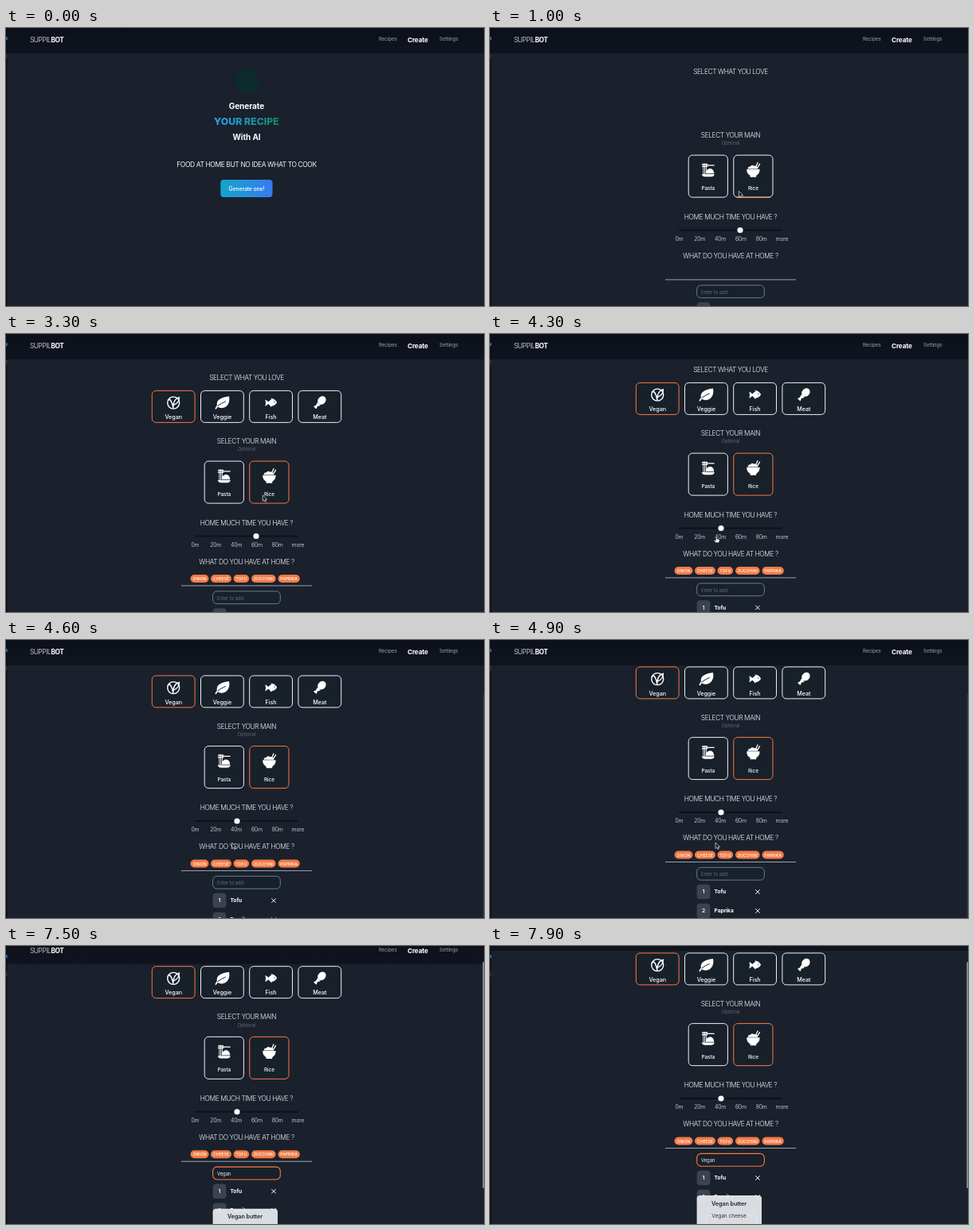
Animation, 600 px wide and 350 px high, one loop 8 s. Source, as an HTML page:

```html
<!DOCTYPE html>
<html lang="en">
<head>
<meta charset="utf-8">
<title>Recipe generator</title>
<style>
html, body { margin: 0; width: 100%; height: 100%; overflow: hidden; background: #1a212c; }
svg { display: block; width: 600px; height: 350px; font-family: Inter, Roboto, sans-serif; }
</style>
</head>
<body>
<svg id="stage" viewBox="0 0 600 350" xmlns="http://www.w3.org/2000/svg">
  <defs>
    <linearGradient id="title"><stop offset="0" stop-color="#2fa4ec"/><stop offset=".55" stop-color="#1c92b4"/><stop offset="1" stop-color="#12895a"/></linearGradient>
    <linearGradient id="button"><stop offset="0" stop-color="#13a5cb"/><stop offset="1" stop-color="#397af0"/></linearGradient>
    <linearGradient id="hover"><stop offset="0" stop-color="#12b1d2"/><stop offset="1" stop-color="#2d6be6"/></linearGradient>
    <linearGradient id="bar" x2="0" y2="1"><stop offset="0" stop-color="#0c101b"/><stop offset="1" stop-color="#0f141f"/></linearGradient>
  </defs>
</svg>
<script>
const LOOP = 8000, STEP = 100;
const WHITE = '#fff', EDGE = '#eef0f3', ORANGE = '#f47b45', INK = '#1a212c';
const svg = document.getElementById('stage');

function el(tag, attrs, parent, text) {
  const n = document.createElementNS('http://www.w3.org/2000/svg', tag);
  set(n, attrs);
  if (text) n.textContent = text;
  parent.appendChild(n);
  return n;
}
function set(n, attrs) {
  for (const k in attrs) n.setAttribute(k, attrs[k]);
}
const group = (parent, x = 0, y = 0) => el('g', { transform: `translate(${x} ${y})` }, parent);
const rect = (p, x, y, width, height, rx, fill, more) =>
  el('rect', { x, y, width, height, rx, fill, ...more }, p);
const path = (p, d, more) => el('path', { d, fill: WHITE, ...more }, p);
const line = (p, d, width, stroke = WHITE) =>
  path(p, d, { fill: 'none', stroke, 'stroke-width': width, 'stroke-linecap': 'round', 'stroke-linejoin': 'round' });
// text placed by the middle of its capitals
function label(p, x, cy, str, size, weight = 400, fill = WHITE, anchor = 'middle', track = -.01) {
  return el('text', {
    x, y: cy + size * .36, 'font-size': size, 'font-weight': weight, fill,
    'text-anchor': anchor, 'letter-spacing': track * size
  }, p, str);
}
const heading = (p, cy, str) => label(p, 302, cy, str, 8.4, 300, '#f1f3f5', 'middle', -.05);
const show = (n, on) => set(n, { display: on ? 'inline' : 'none' });

// piecewise linear track: [time, value] pairs
function track(t, keys) {
  let a = keys[0];
  for (const b of keys) {
    if (t < b[0]) return b === a ? a[1] : a[1] + (b[1] - a[1]) * (t - a[0]) / (b[0] - a[0]);
    a = b;
  }
  return a[1];
}
const fade = (t, from, ms) => track(t, [[from, 0], [from + ms, 1]]);

const icons = {
  Vegan(g) {
    el('circle', { r: 7.5, fill: 'none', stroke: WHITE, 'stroke-width': 1.4 }, g);
    line(g, 'M-4.6-4C-2.6-2.4-1.2 1.4-.4 6.4C-.6 1.6 .6-4.6 7.2-7C7.4-2.4 5 1-.1 3', 1.4);
    line(g, 'M-6.8-3.6L-4.6-4', 1.4);
  },
  Veggie(g) {
    path(g, 'M-9 7.4C-8 5.4-7.2 4.4-6.6 3.2C-7.6-4-1-6.6 8.6-8C10.4 0 6 7-1 6.6C-3 6.5-4.4 5.8-5.4 5.2L-8 8.4Z');
    line(g, 'M-5.6 4C-2.4 1 .6 0 4-1.6', 1, INK);
  },
  Fish(g) {
    path(g, 'M-7.4-3.9C-5.6-3.4-4-2.2-3-1.2C-1.4-3.2-.2-3.8 .8-4L-.4-5.6C2.6-5.6 4.6-4.4 5.4-3.2C6.8-2.2 7.4-1 7.4 0C5.4 3 3.2 4.2 1.4 4L.2 5.4L-1.2 3.5C-2.2 2.6-2.8 2-3.2 1.4C-4.6 2.2-5.6 3.4-7.4 4.3C-6.4 2-6.4-2-7.4-3.9Z');
    el('circle', { cx: 4.2, cy: -1, r: .7, fill: INK }, g);
  },
  Meat(g) {
    el('ellipse', { rx: 5.7, ry: 4.8, fill: WHITE, transform: 'translate(2.6 -3) rotate(-48)' }, g);
    path(g, 'M-2.6-.6L1 3.2C-.6 4.2-2.2 4-3.4 5C-3 7-4.2 8.2-5.4 7.2C-5.6 6.6-5.8 6.2-6.4 6C-8 5.6-7.6 3.2-5.4 3.6C-4 2.4-3.8 .6-2.6-.6Z');
  },
  Pasta(g) {
    line(g, 'M-7.4-7.2H-1M-7.4-4.6H-1M-1-5.9H7.4', 1.2);
    line(g, 'M-6-8V5M-4.2-8V5M-2.4-8V4', .9);
    path(g, 'M-3 4.4C-3 .4-.4-1.8 2.4-1.8C5.4-1.8 7.4 .8 7.4 4.4Z');
    path(g, 'M-8 5.2H8C7.4 7.6 6 8.4 4 8.4H-4C-6 8.4-7.4 7.6-8 5.2Z');
  },
  Rice(g) {
    path(g, 'M-8.2-1H8.2C8.2 3.4 6.2 5.8 3.8 7V9H-3.8V7C-6.2 5.8-8.2 3.4-8.2-1Z');
    path(g, 'M-6.8-1.6C-6.6-3.8-5-4.8-3.4-4.4C-2.6-6.4-.2-6.4 .8-5C2.8-5.8 5.6-4.4 5.8-1.6Z');
    line(g, 'M3-3.4L5.6-9.2M5-2.4L8.2-7.6', 1.3);
  }
};

rect(svg, 0, 0, 600, 350, 0, INK);

// welcome page
const home = group(svg);
el('circle', { cx: 303, cy: 67, r: 15, fill: '#0d2a2c' }, home);
label(home, 302, 98, 'Generate', 10.1, 700, WHITE, 'middle', -.01);
label(home, 302, 117.5, 'YOUR RECIPE', 12.3, 800, 'url(#title)', 'middle', 0);
label(home, 302, 137, 'With AI', 10, 700);
label(home, 302, 171.5, 'FOOD AT HOME BUT NO IDEA WHAT TO COOK', 8.5, 400, '#f1f3f5', 'middle', -.05);
const startBtn = rect(home, 269.3, 191, 65.2, 22, 4, 'url(#button)');
label(home, 302, 202.7, 'Generate one!', 6.9, 500, WHITE, 'middle', -.02);

// recipe form
const form = group(svg);
function card(name, x, y, w, h, iconY, textY, size) {
  const g = group(form);
  const frame = rect(g, x, y, w, h, 5, '#18202a', { stroke: EDGE, 'stroke-width': 1 });
  icons[name](group(g, x + w / 2, iconY));
  label(g, x + w / 2, textY, name, size, 500);
  return { g, frame };
}
heading(form, 55.4, 'SELECT WHAT YOU LOVE');
const diets = ['Vegan', 'Veggie', 'Fish', 'Meat'].map((name, i) =>
  card(name, 183.3 + i * 61.2, 71.4, 53.8, 40, 86.6, 104.6, 7.2));
const veganGlow = line(form, 'M187 112.4H234', .9, '#8fa3bd');
heading(form, 135.2, 'SELECT YOUR MAIN');
label(form, 302, 145.3, 'Optional', 5.8, 400, '#5f6672');
const [, rice] = ['Pasta', 'Rice'].map((name, i) =>
  card(name, 249.2 + i * 56.6, 160.1, 49.2, 53, 178.8, 201.7, 6.4));
const riceGlow = line(form, 'M310 213.2H351', 1.2, '#e8955f');

heading(form, 237.5, 'HOME MUCH TIME YOU HAVE ?');
rect(form, 237, 253.4, 130, 2.2, 1.1, '#0d1119');
const thumb = el('circle', { cx: 314, cy: 254.5, r: 3.6, fill: WHITE }, form);
['0m', '20m', '40m', '60m', '80m', 'more'].forEach((s, i) =>
  label(form, 237.4 + i * 25.8, 265.4, s, 6.9, 300, EDGE, 'middle', -.03));

heading(form, 286.5, 'WHAT DO YOU HAVE AT HOME ?');
const chips = [['ONION', 231.5, 23], ['CHEESE', 257, 26], ['TOFU', 285.5, 19.6], ['ZUCCHINI', 308, 30.6], ['PAPRIKA', 341.5, 27.3]]
  .map(([name, x, w]) => {
    const g = group(form);
    rect(g, x, 303, w, 10, 5, ORANGE);
    label(g, x + w / 2, 308.2, name, 5.2, 500);
    return g;
  });
rect(form, 220, 316.5, 164, .8, 0, '#bcc2ca');
const input = rect(form, 259.7, 323.9, 84.6, 15.8, 5, '#18202b');
const hint = label(form, 265, 332.4, 'Enter to add', 5.9, 400, '#636a76', 'start');
const typed = label(form, 265, 332.4, '', 5.9, 400, EDGE, 'start');
const caret = rect(form, 264.8, 328.4, .6, 7.2, 0, WHITE);
['Tofu', 'Paprika'].forEach((name, i) => {
  const y = 354.5 + i * 24;
  rect(form, 259.6, y - 9.2, 16.8, 18.4, 4, '#3c4350');
  label(form, 268, y, i + 1, 6.8, 600);
  label(form, 281.5, y, name, 6.7, 700, WHITE, 'start');
  line(form, `M333.6 ${y - 2.4}l4.8 4.8m0-4.8l-4.8 4.8`, 1);
});
rect(form, 271, 402, 64, 22, 4, 'none', { stroke: WHITE, 'stroke-width': 1.2 });
const menu = group(form);
rect(menu, 259.6, 376.5, 81.4, 48, 4, '#e4e6ea', { opacity: .95 });
label(menu, 300, 386.6, 'Vegan butter', 7.2, 600, '#1f2733');
label(menu, 300, 402.2, 'Vegan cheese', 6.6, 400, '#2a323d');

// header and window edges
const header = group(svg);
rect(header, 0, 0, 600, 32, 0, 'url(#bar)');
const brand = label(header, 30, 15, '', 8.4, 300, EDGE, 'start', -.05);
el('tspan', {}, brand, 'SUPPIL');
el('tspan', { 'font-weight': 700, fill: WHITE }, brand, 'BOT');
label(header, 468, 13.9, 'Recipes', 6.1, 500, '#8b919c', 'start');
label(header, 504, 15.1, 'Create', 8.2, 700, WHITE, 'start', -.02);
label(header, 544, 13.9, 'Settings', 6.1, 500, '#8b919c', 'start');
rect(svg, 0, 0, 1.5, 350, 0, '#0a0d14');
rect(svg, 0, 11, 1.8, 4.2, 1, '#1f6fd0');
rect(svg, 0, 32.5, 1.2, 6, 0, '#343a44');
const scrollbar = rect(svg, 598.3, 68, 1.7, 282, .8, '#3a404a');

// pointers, drawn from their hot spot
const arrow = group(svg), hand = group(svg), beam = group(svg);
path(arrow, 'M0 0V7.6L1.8 6L3 8.6L4.3 8L3.1 5.5H5.4Z', { fill: '#10141c', stroke: '#e8eaee', 'stroke-width': .7 });
path(hand, 'M-.8 0C-.8-1 .7-1 .7 0V2.4L3 3C3.8 3.2 4 3.8 3.8 4.6L3.2 7.4H-1.2L-3 4.6C-3.2 3.8-2.4 3.4-1.8 4L-.8 4.8Z', { stroke: '#10141c', 'stroke-width': .6 });
line(beam, 'M-1.8-4Q0-4 0-3V3Q0 4 1.8 4M1.8-4Q0-4 0-3M0 3Q0 4-1.8 4', 1, '#d5d8de');

const cursorPath = [
  [100, 370, 328], [200, 357, 300], [400, 326, 232], [600, 314, 208], [800, 313, 206], [1100, 312, 205],
  [1500, 272, 152], [1900, 227, 101], [2200, 224, 97], [2500, 224, 97], [2800, 272, 140], [3000, 324, 184],
  [3200, 325, 186], [3600, 314, 253], [3700, 314, 254], [4100, 290, 255], [4300, 284.3, 255.4], [4900, 283, 255],
  [5600, 283, 256], [6000, 288.5, 288]
];
const cursorX = cursorPath.map(([t, x]) => [t, x]);
const cursorY = cursorPath.map(([t, , y]) => [t, y]);
const scrollKeys = [[4200, 0], [4300, 10], [4500, 21], [4700, 32], [4900, 37.5], [5300, 36.5],
  [7400, 36.5], [7600, 55], [7800, 61.5], [7900, 62.5]];

function draw(t) {
  const scroll = track(t, scrollKeys);
  const lift = t > 7400 ? scroll - 36.5 : 0;
  const focus = t >= 6100;
  show(home, t < 1000);
  show(form, t >= 1000);
  set(startBtn, { fill: t >= 600 ? 'url(#hover)' : 'url(#button)' });
  set(form, { transform: `translate(0 ${-scroll})` });
  set(header, { transform: `translate(0 ${-lift})` });

  diets.forEach((d, i) => set(d.g, { opacity: fade(t, 1000 + i * 80, 400) }));
  chips.forEach((c, i) => set(c, { opacity: fade(t, 1200 + i * 100, 300) }));
  set(diets[0].frame, { stroke: t >= 2100 ? ORANGE : EDGE });
  set(rice.frame, { stroke: t >= 3100 ? ORANGE : EDGE });
  show(veganGlow, t >= 2000 && t < 2500);
  show(riceGlow, t >= 1000 && t < 1200);
  set(thumb, { cx: track(t, [[3700, 314], [4100, 290]]) });

  const count = t >= 6900 ? 5 : Math.max(0, Math.min(4, Math.floor((t - 6300) / 100)));
  typed.textContent = 'Vegan'.slice(0, count);
  show(hint, !count);
  show(caret, focus && t < 6400);
  set(input, { stroke: focus ? ORANGE : '#7896ac', 'stroke-width': focus ? 1.1 : .8 });
  show(menu, t >= 6900);

  show(scrollbar, t >= 4600);
  set(scrollbar, lift
    ? { y: 20, height: 285, fill: '#8d939c' }
    : { y: 68, height: 282, fill: '#2b323d' });

  const pos = `translate(${track(t, cursorX)} ${track(t, cursorY)})`;
  const kind = t < 100 || t >= 6400 ? null
    : t >= 6000 ? beam
    : (t >= 700 && t < 1000) || (t >= 3600 && t < 4600) ? hand : arrow;
  for (const c of [arrow, hand, beam]) {
    show(c, c === kind);
    set(c, { transform: pos });
  }
}

const start = performance.now();
function tick() {
  const t = (performance.now() - start) % LOOP;
  draw(Math.floor(t / STEP) * STEP);
  requestAnimationFrame(tick);
}
tick();
</script>
</body>
</html>
```
